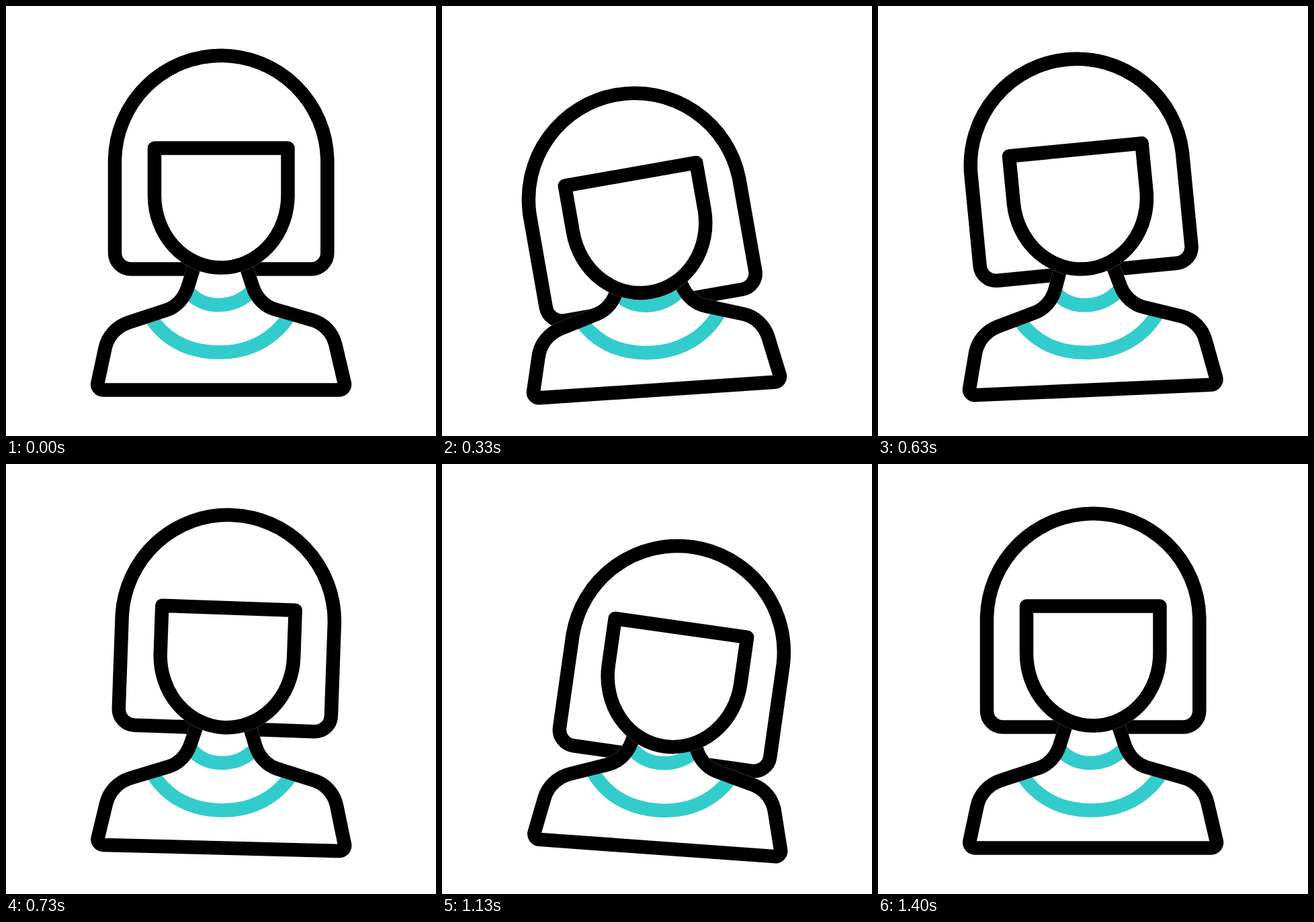
Write an HTML page that moves like this. It is 640 px wide and 640 px high and loops after 2 s.

```html
<!DOCTYPE html>
<html lang="en">
<head>
<meta charset="utf-8">
<title>Head tilt</title>
<style>
  html, body { margin: 0; width: 100%; height: 100%; overflow: hidden; background: #fff; }
  svg { display: block; width: 100vw; height: 100vh; fill: none; stroke-width: 20.5; stroke-linejoin: round; }
  .ink { stroke: #000; }
  .mask { fill: #fff; stroke: #fff; }
  .teal { stroke: #33cccc; }
</style>
</head>
<body>
<svg viewBox="0 0 640 640">
  <defs>
    <path id="torso" d="M282 381.5 L270.5 418.5 C265.3 435 253.6 447.7 239 452.5 L182.5 471
      C164.7 476.9 151.4 491.5 147.5 509.5 L136.4 561.4 A8.3 8.3 0 0 0 144.5 571.5 H495.7
      A8.3 8.3 0 0 0 503.8 561.3 L490.5 504.5 C486.3 486.5 473.2 472.5 456 467.5
      L400.5 451.5 C385.3 447.1 372.9 434.7 367.5 418.5 L355.2 381.5"/>
    <path id="oval" d="M221 211.5 H419.5 V282 A99.2 107.5 0 0 1 221 282 Z"/>
  </defs>
  <g id="hair">
    <path class="ink" d="M162 228 A158.2 158.2 0 0 1 478.3 228 V367.5 A24 24 0 0 1 454.3 391.5
      H186 A24 24 0 0 1 162 367.5 Z"/>
  </g>
  <g id="body">
    <use href="#torso" class="mask"/>
    <path class="teal" d="M270 423.5 C281 437 295 445 316 445 C337 445 353 438 368.5 421.5"/>
    <path class="teal" d="M215 463 C237 497 272 515.5 318 515.5 C362 515.5 399 496 422 460"/>
    <use href="#torso" class="ink"/>
  </g>
  <g id="face">
    <use href="#oval" class="mask"/>
    <use href="#oval" class="ink"/>
  </g>
</svg>
<script>
  const LOOP = 2000, STEP = 100 / 3, END = 42;

  // Tracks: [time in 1/30 s, value], eased in and out between keys
  const lean = [[0, 0], [15, -5.2], [28, 6.8], [END, 0]];
  const tilt = [[0, 0], [14, -12.45], [28.5, 12.65], [END, 0]];
  const hairDrop = [[0, 0], [10, 53.6], [20.8, 0], [31.6, 53.6], [END, 0]];
  const faceDrop = [[0, 0], [10, 36], [20.2, 0], [31.3, 36], [END, 0]];

  function at(track, n) {
    const i = Math.max(1, track.findIndex(key => key[0] >= n));
    const [t0, a] = track[i - 1], [t1, b] = track[i];
    const u = (n - t0) / (t1 - t0);
    return a + (b - a) * u * u * (3 - 2 * u);
  }

  const [hair, body, face] = ["hair", "body", "face"].map(id => document.getElementById(id));

  // The body sways about its base; hair and face turn on the neck and nod by different amounts
  function draw(ms) {
    const n = Math.min(END, Math.floor((ms % LOOP + 3.4) / STEP));
    const sway = at(lean, n);
    const base = `rotate(${sway} 320 572)`;
    const neck = `${base} rotate(${at(tilt, n) - sway} 320 416)`;
    body.setAttribute("transform", base);
    hair.setAttribute("transform", `${neck} translate(0 ${at(hairDrop, n)})`);
    face.setAttribute("transform", `${neck} translate(0 ${at(faceDrop, n)})`);
  }

  const start = performance.now();
  function tick() {
    draw(performance.now() - start);
    requestAnimationFrame(tick);
  }
  tick();
</script>
</body>
</html>
```
